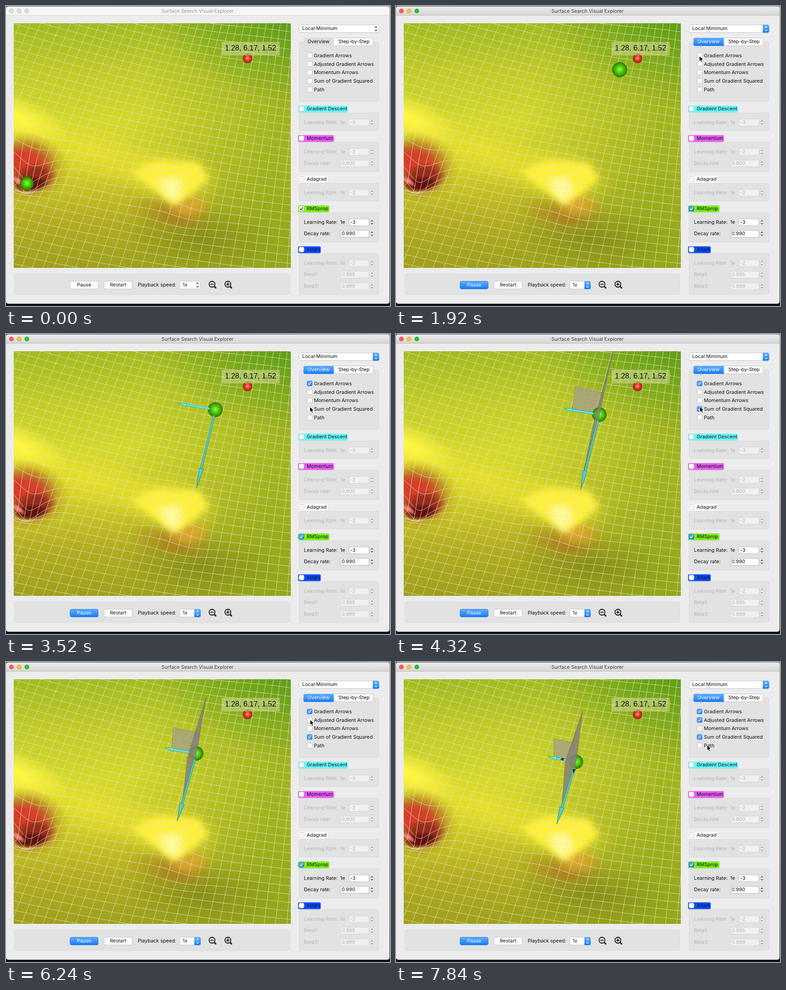
Recreate the animation shown at these times as an HTML page with a canvas. Size 848x661 px, loop 8000 ms.

```html
<!DOCTYPE html>
<html lang="en">
<head>
<meta charset="utf-8">
<title>Surface Search Visual Explorer</title>
<style>
html, body { margin: 0; width: 100%; height: 100%; overflow: hidden; background: #14101c; }
canvas { display: block; }
</style>
</head>
<body>
<canvas id="stage" width="848" height="661"></canvas>
<script>
const W = 848, H = 661, LOOP = 8000, STEP = 160;
const VIEW = { x: 17, y: 38, w: 612, h: 539 };
const UI = 'Inter, "Open Sans", sans-serif';
const ACTIVATE = 960, RESTART = 1080;
const screen = document.getElementById('stage').getContext('2d');
let ctx = screen;

// ---- drawing helpers ----
function text(s, x, y, color = '#111', size = 10.9, align = 'left', family = UI) {
  ctx.font = `${size}px ${family}`;
  ctx.textAlign = align;
  ctx.textBaseline = 'middle';
  ctx.fillStyle = color;
  ctx.fillText(s, x, y);
}
function box(x, y, w, h, r, fill, stroke) {
  ctx.beginPath();
  ctx.roundRect(x, y, w, h, r);
  ctx.fillStyle = fill;
  ctx.fill();
  if (stroke) { ctx.strokeStyle = stroke; ctx.lineWidth = 1; ctx.stroke(); }
}
function line(points, color, width = 1) {
  ctx.beginPath();
  points.forEach(p => ctx.lineTo(p[0], p[1]));
  ctx.strokeStyle = color;
  ctx.lineWidth = width;
  ctx.stroke();
}
function poly(points, fill, stroke) {
  ctx.beginPath();
  points.forEach(p => ctx.lineTo(p[0], p[1]));
  ctx.closePath();
  ctx.fillStyle = fill;
  ctx.fill();
  if (stroke) { ctx.strokeStyle = stroke; ctx.lineWidth = 1; ctx.stroke(); }
}
function shade(x0, y0, x1, y1, ...stops) {
  const g = ctx.createLinearGradient(x0, y0, x1, y1);
  stops.forEach((c, i) => g.addColorStop(i / (stops.length - 1), c));
  return g;
}
const blue = (y, h) => shade(0, y, 0, y + h, '#64aefa', '#147cf8');

// Linear interpolation over keys of the form [position, ...values].
function track(keys, at, ease = k => k) {
  let i = 0;
  while (i < keys.length - 2 && at > keys[i + 1][0]) i++;
  const a = keys[i], b = keys[i + 1];
  const k = ease(Math.max(0, Math.min(1, (at - a[0]) / (b[0] - a[0]))));
  return a.slice(1).map((v, n) => v + (b[n + 1] - v) * k);
}

// ---- surface ----
const bell = (x, y, cx, cy, rx, ry) => Math.exp(-(((x - cx) / rx) ** 2) - ((y - cy) / ry) ** 2);

function meshPoint(u, v) {
  const x = u + (v - 220) * (0.32 * (u / 629) ** 2 - 0.42);
  const y = v + 0.28 * u - 0.00012 * u * u;
  const pit = bell(x, y, 45, 345, 58, 44), hill = bell(x, y, 362, 400, 60, 48);
  return [x + (45 - x) * 0.4 * pit + 8 * hill,
          y + 60 * pit - 20 * hill + 10 * bell(x, y, 390, 470, 70, 35) - 30 * bell(x, y, 660, 30, 170, 120)];
}
function blob(x, y, rx, ry, turn, rgb, alpha = 1, core = 0) {
  ctx.save();
  ctx.translate(x, y);
  ctx.rotate(turn);
  ctx.scale(rx, ry);
  const g = ctx.createRadialGradient(0, 0, 0, 0, 0, 1);
  const fade = k => `rgba(${rgb},${alpha * k})`;
  g.addColorStop(0, fade(1));
  g.addColorStop(core, fade(1));
  g.addColorStop(core + (1 - core) * 0.5, fade(0.5));
  g.addColorStop(1, fade(0));
  ctx.fillStyle = g;
  ctx.fillRect(-1, -1, 2, 2);
  ctx.restore();
}
function softPoly(points, fill, blur) {
  ctx.filter = `blur(${blur}px)`;
  poly(points, fill);
  ctx.filter = 'none';
}
function drawSurface() {
  const { x, y, w, h } = VIEW;
  ctx.beginPath();
  ctx.rect(x, y, w, h);
  ctx.clip();
  ctx.fillStyle = shade(0, y, 0, y + h, '#a2ba1f', '#c0cc25', '#d4d829', '#d2cf27', '#b3ae1f', '#9f9f1b');
  ctx.fillRect(x, y, w, h);
  ctx.fillStyle = shade(330, 0, 640, 60, 'rgba(144,168,24,0)', 'rgba(144,168,24,.75)');
  ctx.fillRect(x, y, w, h);
  blob(665, 0, 340, 220, 0, '72,154,18', 0.9);
  blob(430, 510, 170, 75, 0.1, '128,132,18', 0.7);
  blob(190, 320, 190, 60, 0.35, '240,230,42', 0.7);
  blob(28, 248, 120, 52, 0.4, '255,246,56', 1, 0.15);
  // peak and the hollow in front of it
  blob(365, 455, 100, 42, 0.12, '180,132,34', 0.75, 0.1);
  blob(360, 375, 125, 68, 0.2, '240,232,40', 0.7, 0.2);
  blob(402, 440, 55, 32, -0.1, '222,166,46', 0.95, 0.2);
  blob(378, 470, 52, 15, 0.15, '172,128,30', 0.7, 0.2);
  softPoly([[275, 365], [335, 340], [425, 345], [448, 380], [405, 418], [373, 438], [335, 412]], '#fff036', 7);
  softPoly([[338, 380], [385, 378], [390, 410], [372, 436], [345, 410]], '#fffa98', 8);
  // crater
  blob(45, 354, 94, 78, 0.2, '180,136,36', 0.95, 0.45);
  blob(44, 352, 72, 60, 0.2, '198,96,38', 0.95, 0.5);
  blob(38, 344, 58, 36, 0.15, '214,62,40', 1, 0.5);
  blob(62, 378, 50, 34, -0.2, '150,44,26', 1, 0.5);
  blob(55, 392, 40, 18, -0.1, '96,16,10', 1, 0.5);
  blob(28, 386, 20, 7, 0.65, '246,130,116', 1, 0.3);
  // wire mesh
  const columns = [], rows = [];
  for (let u = -200; u < 860; u += 20) columns.push(u);
  for (let i = 0; i < 50; i++) rows.push(-150 + 15 * i + 0.05 * i * i);
  const thread = (n, at) => line(Array.from({ length: n }, (_, i) => at(i * 5)), 'rgba(228,224,212,.8)', 1);
  columns.forEach(u => thread(165, s => meshPoint(u, s - 160)));
  rows.forEach(v => thread(215, s => meshPoint(s - 200, v)));
}
function makeSurface() {
  const layer = document.createElement('canvas');
  layer.width = W;
  layer.height = H;
  ctx = layer.getContext('2d');
  drawSurface();
  ctx = screen;
  return layer;
}
const surface = makeSurface();

// ---- window controls ----
function checkbox(x, y, checked, active) {
  const filled = checked && active;
  box(x - 5.5, y - 5.5, 11, 11, 2.5, filled ? blue(y - 6, 12) : '#fff', filled ? '#2a7de0' : '#bdbdbd');
  if (checked) line([[x - 3, y], [x - 1, y + 3], [x + 3, y - 3]], active ? '#fff' : '#222', 1.5);
}
function chevrons(x, y, color, gap = 2) {
  line([[x - 2.5, y - gap], [x, y - gap - 3], [x + 2.5, y - gap]], color, 1.2);
  line([[x - 2.5, y + gap], [x, y + gap + 3], [x + 2.5, y + gap]], color, 1.2);
}
function popup(x, y, w, label, active) {
  box(x + .5, y + .5, w - 1, 17, 3.5, '#fff', '#c4c4c4');
  if (active) box(x + w - 14, y, 14, 18, [0, 4, 4, 0], blue(y, 18));
  chevrons(x + w - 7, y + 9, active ? '#fff' : '#333');
  text(label, x + 7, y + 9);
}
function button(x, w, label, lit) {
  box(x + .5, 606.5, w - 1, 17, 3.5, lit ? blue(606, 18) : '#fff', lit ? '#2a80e8' : '#c4c4c4');
  text(label, x + w / 2, 615, lit ? '#fff' : '#111', 10.9, 'center');
}
const panel = (x, y, w, h) => box(x + .5, y + .5, w, h, 3, '#e2e2e2', '#d8d8d8');

function field(y, label, value, enabled, exponent) {
  const ink = enabled ? '#111' : '#b4b4b4';
  const x = exponent ? 757 : 738;
  text(label, 658, y, ink);
  if (exponent) text('1e', 738, y, ink);
  box(x + .5, y - 7.5, 801 - x, 15, 0, enabled ? '#fff' : '#f0f0f0', enabled ? '#b8b8b8' : '#d4d4d4');
  text(value, x + 3, y, ink);
  box(803.5, y - 7.5, 9, 15, 4, '#f2f2f2', '#cfcfcf');
  chevrons(808, y, enabled ? '#444' : '#909090', 1.5);
}
const METHODS = [
  ['Gradient Descent', 227, 110, '#68f6f8', '-3'],
  ['Momentum', 292, 79, '#e75cf2', '-2', ['Decay rate:', '0.800']],
  ['Adagrad', 382, 65, '#ffffff', '-2'],
  ['RMSprop', 447, 69, '#78ee1c', '-3', ['Decay rate:', '0.990']],
  ['Adam', 537, 50, '#0a4dff', '-2', ['Beta1:', '0.995'], ['Beta2:', '0.999']]
];
function drawMethod([name, y, width, color, rate, ...extra], active) {
  const on = name === 'RMSprop';
  panel(647, y + 8, 176, 39 + extra.length * 25.5);
  box(645, y - 7.5, width, 15, 3, color);
  checkbox(652.5, y - .5, on, active);
  text(name, 664, y);
  field(y + 29.5, 'Learning Rate:', rate, on, true);
  extra.forEach(([label, value], i) => field(y + 55 + i * 25.5, label, value, on));
}
function magnifier(x, plus) {
  ctx.beginPath();
  ctx.arc(x - 1, 613, 6.5, 0, 7);
  ctx.strokeStyle = '#111';
  ctx.lineWidth = 1.8;
  ctx.stroke();
  line([[x + 4, 618], [x + 8, 622]], '#111', 2.6);
  line([[x - 4.5, 613], [x + 2.5, 613]], '#111', 1.8);
  if (plus) line([[x - 1, 609.5], [x - 1, 616.5]], '#111', 1.8);
}
function drawWindow(t, active) {
  ctx.fillStyle = '#14101c';
  ctx.fillRect(0, 0, W, H);
  ctx.fillStyle = shade(0, 0, W, 0, '#56586e', '#34365c', '#8a8a98');
  ctx.fillRect(0, 0, W, 5);
  ctx.fillStyle = shade(0, 0, 0, H, '#aaa', '#777', '#502a30', '#1c1824');
  ctx.fillRect(846, 0, 2, 650);
  box(0, 1, 847, 655, 5, '#ececec');
  box(0, 1, 847, 19, [5, 5, 0, 0], active ? shade(0, 1, 0, 20, '#ebebeb', '#d6d6d6') : '#f6f6f6');
  line([[0, 20.5], [847, 20.5]], active ? '#bcbcbc' : '#d6d6d6');
  ['#fc5b57', '#fdbc2e', '#28c131'].forEach((color, i) => {
    ctx.beginPath();
    ctx.arc(12 + i * 17, 11, 5, 0, 7);
    ctx.fillStyle = active ? color : '#dcdcdc';
    ctx.fill();
    ctx.strokeStyle = 'rgba(0,0,0,.12)';
    ctx.lineWidth = 1;
    ctx.stroke();
  });
  text('Surface Search Visual Explorer', 423, 11.5, active ? '#444' : '#999', 10.9, 'center');

  panel(19, 590, 607, 45);
  button(141, 63, 'Pause', active && t >= 1120);
  button(216, 63, 'Restart', active && t < 1120);
  text('Playback speed:', 291, 615);
  popup(383, 606, 47, '1x', active);
  magnifier(456, false);
  magnifier(491, true);

  popup(647, 41, 177, 'Local Minimum', active);
  panel(647, 79, 176, 131);
  box(657.5, 70.5, 153, 17, 3.5, '#fff', '#c4c4c4');
  box(657, 70, 67, 18, [4, 0, 0, 4], active ? blue(70, 18) : '#dcdcdc');
  text('Overview', 690, 79, active ? '#fff' : '#111', 10.9, 'center');
  text('Step-by-Step', 768.5, 79, '#111', 10.9, 'center');
  [['Gradient Arrows', 2240], ['Adjusted Gradient Arrows', 7200], ['Momentum Arrows', LOOP],
   ['Sum of Gradient Squared', 4000], ['Path', LOOP]].forEach(([label, since], i) => {
    const y = 109 + i * 18.75;
    checkbox(670.5, y, t >= since, active);
    text(label, 680, y + .5);
  });
  METHODS.forEach(m => drawMethod(m, active));
}

// ---- scene on the surface ----
function sphere(x, y, r, ...colors) {
  const g = ctx.createRadialGradient(x, y - 1, 0, x, y, r);
  colors.forEach((c, i) => g.addColorStop(i / (colors.length - 1), c));
  ctx.beginPath();
  ctx.arc(x, y, r, 0, 7);
  ctx.fillStyle = g;
  ctx.fill();
}
function arrow(from, to, head, wide, thick, fill, edge) {
  const dx = to[0] - from[0], dy = to[1] - from[1], len = Math.hypot(dx, dy);
  const at = (s, n) => [from[0] + (dx * s - dy * n) / len, from[1] + (dy * s + dx * n) / len];
  const neck = len - head;
  poly([at(13, -thick / 2), at(neck, -thick / 2), at(neck, thick / 2), at(13, thick / 2)], fill, edge);
  poly([at(neck, -wide / 2), at(len, 0), at(neck, wide / 2)], fill, edge);
}
const SHEET_KEYS = [ // travel, top corner, far corner, shaft end
  [83, 483, 24, 435, 208, 413, 312],
  [103, 454, 64, 412, 208, 400, 306],
  [122, 430, 91, 390, 211, 379, 315],
  [135, 412, 109, 374, 219, 366, 320]
];
const SQUARE_KEYS = [ // travel, outer top, inner top, outer bottom
  [83, 397, 115, 454, 127, 390, 164],
  [103, 377, 135, 440, 147, 374, 183],
  [122, 361, 154, 418, 166, 359, 198],
  [135, 349, 169, 392, 178, 349, 209]
];
const pairs = v => [[v[0], v[1]], [v[2], v[3]], [v[4], v[5]]];

function drawScene(t) {
  ctx.drawImage(surface, 0, 0);
  ctx.save();
  ctx.beginPath();
  ctx.rect(VIEW.x, VIEW.y, VIEW.w, VIEW.h);
  ctx.clip();
  sphere(533.5, 115.5, 10.5, '#ffc8bc', '#f4503a', '#d8301e', '#8a1c10');

  const run = Math.max(0, t - RESTART);
  const travel = Math.sqrt(1.685 * run + 0.00015 * run * run);
  const ball = run ? [533 - travel, 108 + 0.83 * travel] : [46, 391];
  const left = track([[70, 380, 152], [135, 336, 209]], travel);
  const down = track([[70, 422, 338], [135, 355, 357]], travel);
  if (run && travel < 70) {
    // before the first key the tips keep the same drift
    const k = travel - 70;
    left[0] -= .66 * k; left[1] += .88 * k;
    down[0] -= 1.03 * k; down[1] += .29 * k;
  }
  const sums = t >= 4000;
  if (sums) {
    const [outer, inner, low] = pairs(track(SQUARE_KEYS, travel));
    poly([outer, inner, ball, low], 'rgba(168,162,132,.82)', 'rgba(130,126,110,.6)');
  }
  sphere(...ball, run ? 17 - travel * .011 : 15, '#a0ff50', '#66e814', '#50c80e', '#3a9c0a', '#2a7608');
  if (t >= 2240) {
    arrow(ball, left, 19, 8, 4, '#66eeea', '#35a8a4');
    if (sums) {
      const [top, far, end] = pairs(track(SHEET_KEYS, travel));
      poly([top, ball, end, far], 'rgba(134,128,118,.86)', 'rgba(108,104,92,.6)');
    }
    arrow(ball, down, 48 - travel * .07, 10, 4, '#55ccc8', '#2f8f88');
    if (t >= 7200) {
      const [x, y] = ball;
      poly([[x - 28, y - 8], [x - 34, y - 6], [x - 29, y - 3]], '#000', '#000');
      poly([[x - 6, y + 16], [x - 6, y + 24], [x - 2, y + 17]], '#000', '#000');
    }
  }
  box(476, 79, 129, 30, 3, 'rgba(218,222,160,.5)');
  text('1.28, 6.17, 1.52', 540, 94, '#111', 16.3, 'center', '"Liberation Sans", Arial, sans-serif');
  ctx.restore();
}

// ---- hover help and pointer ----
function drawHelp() {
  ctx.save();
  ctx.shadowColor = 'rgba(0,0,0,.35)';
  ctx.shadowBlur = 6;
  ctx.shadowOffsetY = 3;
  box(671.5, 141.5, 190, 46, 0, '#f8f8f8');
  ctx.restore();
  ['Some methods adjust the gradient by adding or', 'dividing by some numbers (e.g. sum of squares)',
   'gradient shows the calculation result of that', 'for a gradient step.']
    .forEach((s, i) => text(s, 674, 148.5 + i * 11, '#111', 9.3));
}
const POINTER = [
  [480, 330, 661], [960, 247, 615], [1120, 247, 615], [1760, 670, 110], [2400, 670, 110],
  [2880, 671, 160], [4480, 671, 160], [5120, 672, 127], [7360, 671, 127], [7840, 687, 183]
];
function drawPointer(t) {
  if (t < 480) return;
  const [x, y] = track(POINTER, t, k => k * k * (3 - 2 * k));
  const shape = [[0, 0], [0, 12], [2.8, 9.5], [4.8, 14], [7, 13], [5, 8.7], [8.6, 8.5]];
  poly(shape.map(([a, b]) => [x + a, y + b]), '#000', '#fff');
}

function frame(now) {
  const t = Math.floor((now % LOOP) / STEP) * STEP;
  drawWindow(t, t >= ACTIVATE);
  drawScene(t);
  if (t >= 6400 && t < 7200) drawHelp();
  drawPointer(t);
  requestAnimationFrame(frame);
}
requestAnimationFrame(frame);
</script>
</body>
</html>
```
